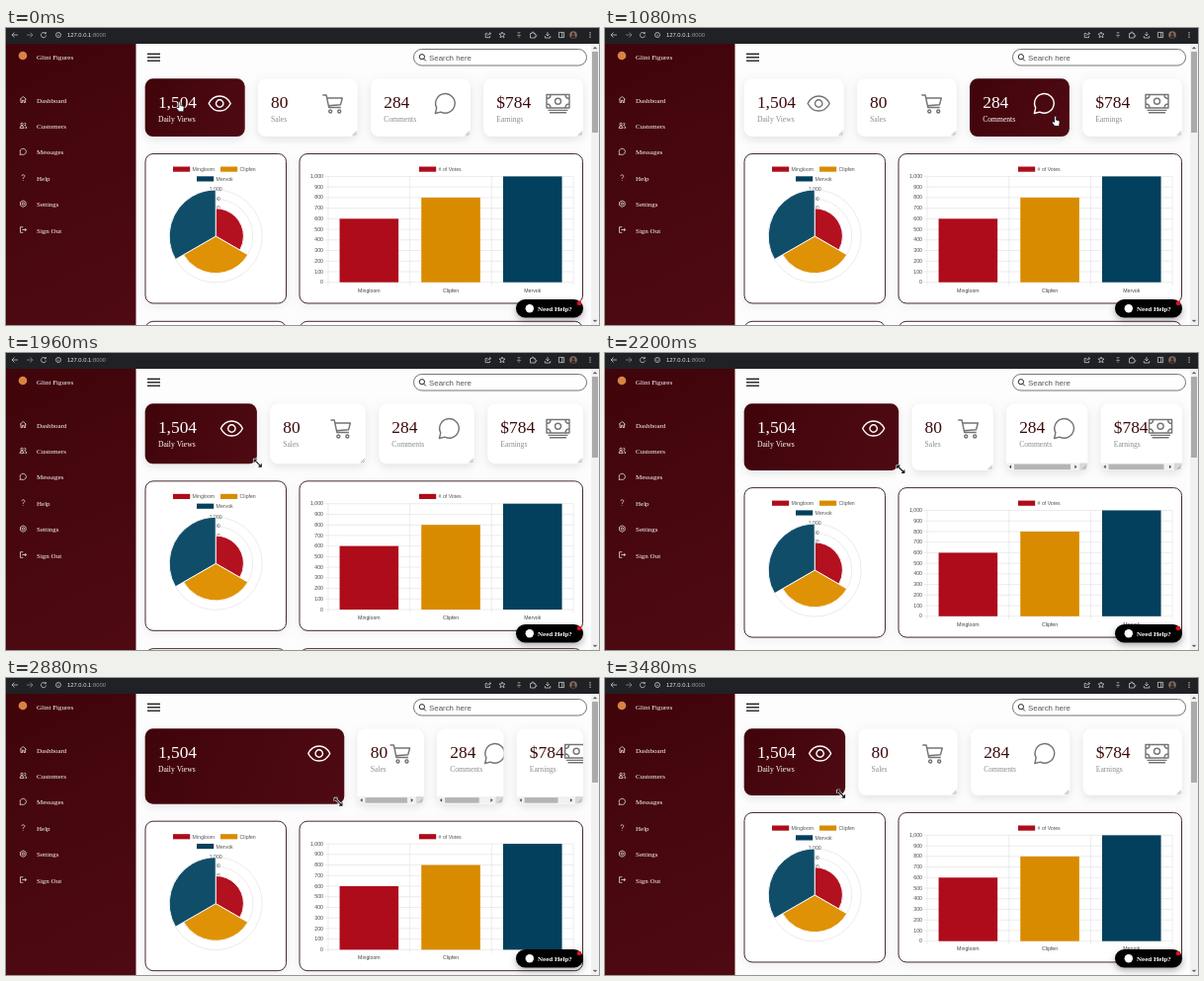
Write an HTML page with a canvas that moves like this. It is 600 by 301 pixels and loops after 3.52 s.

```html
<!DOCTYPE html>
<html lang="en">
<head>
<meta charset="utf-8">
<title>Dashboard</title>
<style>
html, body { margin: 0; width: 100%; height: 100%; overflow: hidden; background: #fdfdfe; }
canvas { display: block; }
</style>
</head>
<body>
<canvas width="600" height="301"></canvas>
<script>
const c = document.querySelector('canvas').getContext('2d');
const LOOP = 3520;
const SERIF = '"Liberation Serif", serif', SANS = '"Liberation Sans", sans-serif';
const RED = '#ae0c1b', ORANGE = '#d98b00', BLUE = '#03405d';
const SERIES = [['Mingloom', 600, RED], ['Clipfen', 800, ORANGE], ['Mervok', 1000, BLUE]];

// Rows of [time, a, b], joined by straight lines.
const pointerKeys = [[0, 176, 80], [600, 415, 88], [900, 528, 87], [1440, 314, 110],
  [1720, 242, 110], [1960, 254.5, 111.5], [2520, 358.5, 126], [2780, 357, 127.5],
  [3120, 287.5, 121], [3480, 239, 117.5], [LOOP, 236, 117]];
const sizeKeys = [[0, 101, 58.7], [1740, 101, 58.7], [1960, 113, 61], [2520, 214, 76.8],
  [2800, 215, 77.5], [3120, 162, 73], [3480, 102.5, 67.7], [LOOP, 100, 67]];

const cards = [
  ['1,504', 'Daily Views', 'M-11 0C-6-10 6-10 11 0C6 10-6 10-11 0ZM3.7 0A3.7 3.7 0 1 1-3.7 0A3.7 3.7 0 1 1 3.7 0'],
  ['80', 'Sales', 'M-10-8.5h3.8l2.6 12.5H8.5M-5.5-5.5H10L8.2 1.2-4.2 2.2M-.6 8a1.5 1.5 0 1 1-3 0a1.5 1.5 0 1 1 3 0M8.4 8a1.5 1.5 0 1 1-3 0a1.5 1.5 0 1 1 3 0'],
  ['284', 'Comments', 'M-10 10l1.3-5.6A9.8 9.8 0 1 1-4.5 8.6Z'],
  ['$784', 'Earnings', 'M-11.5-9h23v13.5h-23ZM3-2.3a3 3 0 1 1-6 0a3 3 0 1 1 6 0M-11.5-5q4 0 4-4M11.5-5q-4 0-4-4M-11.5 .5q4 0 4 4M11.5 .5q-4 0-4 4M-10 6.9h20M-8.5 9.3h17']
];

const menu = [
  ['Dashboard', 'M-3.2-.2L0-3 3.2-.2M-2.3-.8V3h1.5V.8h1.6V3h1.5V-.8'],
  ['Customers', 'M-3.2 2.5q0-2.3 2-2.3t2 2.3ZM0-1.5a1.2 1.2 0 1 1-2.4 0a1.2 1.2 0 1 1 2.4 0M1.2-2.5a1.1 1.1 0 1 1 0 2.1M2 .5q1.4.3 1.4 2h-1.2'],
  ['Messages', 'M-3.2 3.2l.4-1.8A3.1 3.1 0 1 1-1.4 2.8Z'],
  ['Help', 'M-1.4-1.6C-1.2-3.4 1.6-3.4 1.5-1.5C1.4-.3 0-.3 0 1.1M0 2.4v.6'],
  ['Settings', 'M-2.8-1.6L0-3.2 2.8-1.6V1.6L0 3.2-2.8 1.6ZM1.2 0a1.2 1.2 0 1 1-2.4 0a1.2 1.2 0 1 1 2.4 0'],
  ['Sign Out', 'M0-2.8h-2.8v5.6H0M-1 0h4.2M1.8-1.5L3.3 0 1.8 1.5']
];

const toolbar = [
  [9, 'M3 0H-3M-.5-2.5L-3 0-.5 2.5'], [24, 'M-3 0H3M.5-2.5L3 0 .5 2.5'],
  [38, 'M2-1.6A2.6 2.6 0 1 0 2.6.6M2.4-3v1.7H.7'],
  [53, 'M2.5 0a2.5 2.5 0 1 1-5 0a2.5 2.5 0 1 1 5 0M0-.3v1.5M0-1.4v.3'],
  [488, 'M-.8-1.6h-2v4.2h4.4V1M-1 .8Q-.8-1.2 2.5-1.4M1.2-2.8L2.7-1.4 1.2 0'],
  [502, 'M0-3l.9 2H3L1.4.5 2 2.7 0 1.5-2 2.7-1.4.5-3-1h2.1Z'],
  [519, 'M-1.5-2.5h3M0-2.5V3M-2 .5h4'],
  [533, 'M-2.5-1.5h1.6a1 1 0 1 1 1.8 0h1.4v1.6a1 1 0 1 1 0 1.6v1.3h-4.8Z'],
  [548, 'M0-3V1M-1.8-.8L0 1 1.8-.8M-2.7 1v2h5.4v-2'],
  [562, 'M-2.6-2.6h5.2v5.2h-5.2ZM.7-2.6v5.2']
];

const HAND = 'M-1.6.8V-4.4a1 1 0 0 1 2 0V-1.5l2.3.5q1.2.3 1.1 1.6L3.3 4.8H-1.2L-3.8 1.7Q-4-.1-2.5.2Z';

function sample(keys, t) {
  const i = keys.findIndex(k => k[0] > t), a = keys[i - 1], b = keys[i];
  const p = (t - a[0]) / (b[0] - a[0]);
  return [a[1] + (b[1] - a[1]) * p, a[2] + (b[2] - a[2]) * p];
}

function text(s, x, y, size, color, font = SERIF, align = 'left', weight = '') {
  c.font = `${weight} ${size}px ${font}`;
  c.textAlign = align;
  c.fillStyle = color;
  c.fillText(s, x, y);
}

function rect(x, y, w, h, color) {
  c.fillStyle = color;
  c.fillRect(x, y, w, h);
}

function round(x, y, w, h, r, fill, stroke, lw = 1) {
  c.beginPath();
  c.roundRect(x, y, w, h, r);
  if (fill) { c.fillStyle = fill; c.fill(); }
  if (stroke) { c.strokeStyle = stroke; c.lineWidth = lw; c.stroke(); }
}

function disc(x, y, r, color) {
  c.beginPath();
  c.arc(x, y, r, 0, 7);
  c.fillStyle = color;
  c.fill();
}

function line(x1, y1, x2, y2, color, lw = 1) {
  c.beginPath();
  c.moveTo(x1, y1);
  c.lineTo(x2, y2);
  c.strokeStyle = color;
  c.lineWidth = lw;
  c.stroke();
}

function icon(d, x, y, color, lw, fill) {
  const p = new Path2D(d);
  c.save();
  c.translate(x, y);
  c.lineJoin = 'round';
  c.lineWidth = lw;
  c.strokeStyle = color;
  if (fill) { c.fillStyle = fill; c.fill(p); }
  c.stroke(p);
  c.restore();
}

function maroon(x, y, w, h, from = '#40040b', to = '#4f0a13') {
  const g = c.createLinearGradient(x, y, x + w, y + h);
  g.addColorStop(0, from);
  g.addColorStop(1, to);
  return g;
}

function shadow(on, blur = 9, alpha = .1) {
  c.shadowColor = on ? `rgba(0,0,0,${alpha})` : 'transparent';
  c.shadowBlur = on ? blur : 0;
  c.shadowOffsetY = on ? 3 : 0;
}

function drawBrowser() {
  rect(0, 0, 600, 16, '#202124');
  toolbar.forEach(([x, d]) => icon(d, x, 7, x === 24 || x === 519 ? '#85878a' : '#c4c6c9', .8));
  text('127.0.0.1', 62, 9, 5.85, '#e8eaed', SANS);
  text(':8000', 62 + c.measureText('127.0.0.1').width, 9, 5.85, '#94979b', SANS);
  disc(574, 7, 3.8, '#86695f');
  disc(574, 6, 1.5, '#352a2b');
  round(571.8, 7.6, 4.4, 3, 1.4, '#352a2b');
  [-2.3, 0, 2.3].forEach(y => disc(591, 7 + y, .7, '#c4c6c9'));
  rect(592, 16, 8, 285, '#f1f1f1');
  rect(593, 24, 6, 82, '#aaa');
  icon('M-2 1L0-1 2 1Z', 596, 20, '#666', .3, '#666');
  icon('M-2-1L0 1 2-1Z', 596, 297, '#666', .3, '#666');
}

function drawSidebar() {
  rect(0, 16, 131.5, 285, maroon(0, 16, 131, 285));
  disc(17, 28, 4.3, '#d78345');
  text('Glint Figures', 31, 31.5, 7, '#fff');
  menu.forEach(([name, d], i) => {
    const y = 73 + i * 26.4;
    icon(d, 17.3, y - .5, '#eee', .75);
    text(name, 31, y + 2.5, 7, '#fff');
  });
}

function drawHeader() {
  [26.3, 29.8, 33.2].forEach(y => line(143, y, 156, y, '#111', 1.3));
  round(412.5, 21.5, 175, 16.5, 8.2, '#fff', '#666', .9);
  icon('M2 -.6a2.6 2.6 0 1 1-5.2 0a2.6 2.6 0 1 1 5.2 0M1.2 1.4L3.4 3.6', 421.5, 29.8, '#222', 1);
  text('Search here', 428, 32.5, 7.9, '#555', SANS);
}

function drawCard([value, label, d], x, w, h, active) {
  const y = 51.3, right = x + w, bottom = y + h;
  shadow(true);
  round(x, y, w, h, 8, active ? maroon(x, y, w, h) : '#fff');
  shadow(false);
  c.save();
  c.clip();
  text(label, x + 13.2, 94.5, 7.6, active ? '#fff' : '#8c8c8c');
  let tw = c.measureText(label).width;
  text(value, x + 13.2, 81, 17.4, active ? '#fff' : '#3d0a0c');
  tw = Math.max(tw, c.measureText(value).width);
  const left = Math.max(right - 38, x + 13.2 + tw);
  icon(d, left + 12.5, 76.5, active ? '#fff' : '#747474', 1.4);
  const content = 51.4 + tw;
  if (content > w) {
    const track = w - 8;
    rect(x, bottom - 7.5, w, 7.5, '#f1f1f1');
    rect(x + 8, bottom - 6.5, (track - 16) * w / content, 5.5, '#b4b4b4');
    icon('M1-1.6L-1 0 1 1.6Z', x + 4, bottom - 3.8, '#444', .2, '#444');
    icon('M-1-1.6L1 0-1 1.6Z', x + track - 4, bottom - 3.8, '#444', .2, '#444');
    rect(x + track, bottom - 7.5, 8, 7.5, '#d8d8d8');
  }
  c.restore();
  if (!active) {
    line(right - 5, bottom - 1.2, right - 1.2, bottom - 5, '#888', .7);
    line(right - 3, bottom - 1.2, right - 1.2, bottom - 3, '#888', .7);
  }
}

function drawPanels(dy) {
  for (const y of [127.5, 297.3]) {
    shadow(true, 8, .06);
    round(141, y + dy, 142.5, 151.5, 8, '#fff');
    round(297, y + dy, 286.5, 151.5, 8, '#fff');
    shadow(false);
    round(141, y + dy, 142.5, 151.5, 8, null, '#32131a', .9);
    round(297, y + dy, 286.5, 151.5, 8, null, '#32131a', .9);
  }
}

function legend(name, x, y, color) {
  rect(x, y, 17.2, 5.2, color);
  text(name, x + 19.6, y + 4.6, 5.2, '#555', SANS);
}

function drawPolar() {
  const x = 212.2, y = 211;
  [[169, 140.5], [217, 140.5], [193, 150.3]].forEach(([lx, ly], i) =>
    legend(SERIES[i][0], lx, ly, SERIES[i][2]));
  for (let v = 200; v <= 1000; v += 200) {
    c.beginPath();
    c.arc(x, y, v * .047, 0, 7);
    c.strokeStyle = '#dedede';
    c.lineWidth = .6;
    c.stroke();
  }
  for (let v = 200; v <= 1000; v += 200)
    text(v.toLocaleString('en-US'), x, y - v * .047 + 1.4, 5.2, '#555', SANS, 'center');
  SERIES.forEach(([, v], i) => {
    const a = Math.PI * (i * 2 / 3 - .5);
    c.beginPath();
    c.moveTo(x, y);
    c.arc(x, y, v * .047, a, a + Math.PI * 2 / 3);
    c.closePath();
    c.fillStyle = ['#b31020', '#df9205', '#104d69'][i];
    c.fill();
    c.strokeStyle = '#fff';
    c.lineWidth = .9;
    c.stroke();
  });
}

function drawBars() {
  const base = 257.7, step = 82.7;
  legend('# of Votes', 418, 140.5, RED);
  for (let i = 0; i <= 10; i++) {
    const y = base - i * 10.73;
    line(322.5, y, 574, y, '#dfdfdf', .6);
    text((i * 100).toLocaleString('en-US'), 321, y + 1.6, 5.2, '#444', SANS, 'right');
  }
  for (let i = 0; i <= 3; i++) line(326 + i * step, 150.4, 326 + i * step, 261, '#dfdfdf', .6);
  SERIES.forEach(([name, v, color], i) => {
    const mid = 326 + (i + .5) * step, h = v * .1073;
    rect(mid - 29.8, base - h, 59.6, h, color);
    text(name, mid, 267.5, 5.2, '#444', SANS, 'center');
  });
}

function drawHelp(t) {
  const p = (t - 1200) / 560;
  if (p > 0 && p < 1) {
    const grow = 8 * p;
    c.globalAlpha = Math.min(1, 2 * (1 - p));
    round(516 - grow, 275 - grow, 68 + 2 * grow, 18.5 + 2 * grow, 9.2 + grow, null, '#222', 1.1);
    round(514.5, 273.5, 71, 21.5, 10.7, '#fff', '#555', .7);
    c.globalAlpha = 1;
  }
  shadow(true, 6, .3);
  round(516, 275, 68, 18.5, 9.2, '#000');
  shadow(false);
  disc(529.8, 284.2, 4.2, '#fff');
  text('Need Help?', 538, 286.6, 7, '#fff', SERIF, 'left', 'bold');
  disc(580, 279, 2.3, '#e0101c');
}

function drawPointer(x, y, resizing) {
  if (!resizing) return icon(HAND, x, y, '#111', .8, '#fff');
  const d = 'M-3-3L3 3M-3.6-.8V-3.6H-.8M3.6 .8V3.6H.8';
  icon(d, x, y, '#fff', 2.4);
  icon(d, x, y, '#111', 1.1);
}

function draw(t) {
  const [px, py] = sample(pointerKeys, t), [w, h] = sample(sizeKeys, t);
  const resizing = t >= 1700, gap = 13.2, x0 = 140.7;
  const rest = (443.3 - w - 3 * gap) / 3;
  rect(0, 0, 600, 301, '#fdfdfe');
  drawHeader();
  cards.forEach((card, i) => {
    const x = i ? x0 + w + gap + (i - 1) * (rest + gap) : x0, cw = i ? rest : w;
    const over = resizing ? i === 0 : px >= x && px <= x + cw;
    drawCard(card, x, cw, h, over);
  });
  const dy = h - 58.7;
  drawPanels(dy);
  c.save();
  c.translate(0, dy);
  drawPolar();
  drawBars();
  c.restore();
  drawSidebar();
  drawBrowser();
  drawHelp(t);
  drawPointer(px, py, resizing);
}

const start = performance.now();
function frame() {
  draw((performance.now() - start) % LOOP);
  requestAnimationFrame(frame);
}
frame();
</script>
</body>
</html>
```
